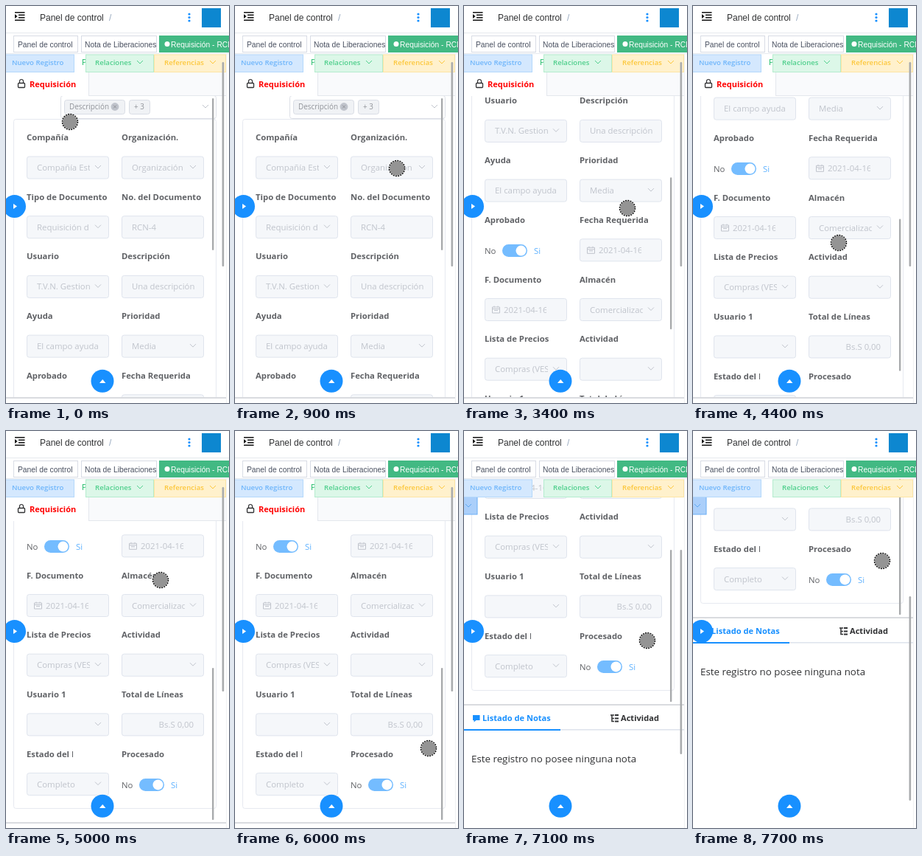
Animation, 303 px wide and 538 px high, one loop 8 s. Source, as an HTML page:

```html
<!DOCTYPE html>
<html lang="es">
<head>
<meta charset="utf-8">
<title>Requisición</title>
<style>
  html, body { margin: 0; width: 100%; height: 100%; overflow: hidden; background: #fff; }
  #stage { display: block; width: 303px; height: 538px; font: 11.4px "Open Sans", "Noto Sans", sans-serif; fill: #606266; }
  .ui { font-family: "Liberation Sans", Arial, sans-serif; }
  .b { font-weight: 700; font-size: 11.3px; }
  .act { font-weight: 600; font-size: 9.6px; }
  .mute { fill: #c0c4cc; }
  .line { fill: none; stroke: #c0c4cc; }
  .box { fill: #f5f7fa; stroke: #dfe4ed; }
  .thumb { fill: #a9abad; }
</style>
</head>
<body>
<svg id="stage" viewBox="0 0 303 538">
  <g id="page">
    <svg y="122" width="299" height="409" viewBox="0 122 299 409"><g id="form"></g></svg>
    <rect id="innerThumb" class="thumb" x="280" y="125" width="2.4" height="206" rx="1.2"/>
    <g id="notes"></g>
  </g>
  <g id="split"></g>
  <g id="tabs"></g>
  <g id="actions"></g>
  <g id="header"></g>
  <rect id="outerThumb" class="thumb" x="293.6" y="76" width="2.6" height="277" rx="1.3"/>
  <g id="floating"></g>
  <g id="touch">
    <circle r="11" fill="#fff" opacity=".7"/>
    <circle r="10" fill="#949494"/>
    <circle r="10.5" fill="none" stroke="#111" stroke-width="1.5" stroke-dasharray="2 1.3"/>
  </g>
</svg>
<script>
const $ = id => document.getElementById(id);

const text = (x, y, str, attrs = '') => `<text x="${x}" y="${y}" ${attrs}>${str}</text>`;
const rect = (x, y, w, h, attrs = '') => `<rect x="${x}" y="${y}" width="${w}" height="${h}" ${attrs}/>`;
const path = (d, attrs = 'class="line"') => `<path d="${d}" ${attrs}/>`;
const circle = (x, y, r, attrs) => `<circle cx="${x}" cy="${y}" r="${r}" ${attrs}/>`;
const chevron = (x, y, attrs) => path(`M${x - 4} ${y - 2}l4 4 4-4`, attrs);
const clipped = (x, y, w, str, cls) =>
  `<svg x="${x}" y="${y - 10}" width="${w}" height="20">${text(0, 14, str, `class="${cls}"`)}</svg>`;

// Controls: x is the left edge of the column, y the vertical centre
const box = (x, y) => rect(x + .5, y - 15, 111, 30, 'rx="3" class="box"');
const controls = {
  select: (x, y, v) => box(x, y) + clipped(x + 14, y, 72, v, 'mute') + chevron(x + 97, y - 1),
  input: (x, y, v) => box(x, y) + clipped(x + 14, y, 90, v, 'mute'),
  number: (x, y, v) => box(x, y) + text(x + 98, y + 4, v, 'class="mute" text-anchor="end"'),
  date: (x, y, v) => box(x, y) + clipped(x + 26, y, 58, v, 'mute') +
    path(`M${x + 10.5} ${y - 3.5}h10v8h-10zm0 2.5h10m-7.5-4v2m5-2v2m-5 4h5`),
  toggle: (x, y) => text(x, y + 5, 'No') + rect(x + 24, y - 7.7, 34, 17, 'rx="8.5" fill="#74bcff"') +
    circle(x + 49.5, y + .8, 7, 'fill="#fff"') + text(x + 67, y + 5, 'Si', 'fill="#5fb2ff"'),
};

const fields = [
  ['Compañía', 'select', 'Compañía Est'], ['Organización.', 'select', 'Organización'],
  ['Tipo de Documento', 'select', 'Requisición d'], ['No. del Documento', 'input', 'RCN-4'],
  ['Usuario', 'select', 'T.V.N. Gestion'], ['Descripción', 'input', 'Una descripción'],
  ['Ayuda', 'input', 'El campo ayuda'], ['Prioridad', 'select', 'Media'],
  ['Aprobado', 'toggle'], ['Fecha Requerida', 'date', '2021-04-16'],
  ['F. Documento', 'date', '2021-04-16'], ['Almacén', 'select', 'Comercializadora'],
  ['Lista de Precios', 'select', 'Compras (VES)'], ['Actividad', 'select', ''],
  ['Usuario 1', 'select', ''], ['Total de Líneas', 'number', 'Bs.S 0,00'],
  ['Estado del Documento', 'select', 'Completo'], ['Procesado', 'toggle'],
];

$('form').innerHTML =
  rect(74.5, 121.5, 211, 31, 'rx="3" fill="#fff" stroke="#dcdfe6"') +
  rect(79.5, 127.5, 82, 19, 'rx="3" fill="#f0f2f5" stroke="#d9dde5"') +
  text(86, 140, 'Descripción', 'font-size="9.9" fill="#909399"') +
  circle(148, 136.5, 5.4, 'fill="#c0c4cc"') +
  path('M146 134.500l4 4m0-4l-4 4', 'stroke="#909399"') +
  rect(167.5, 127.5, 28, 19, 'rx="3" fill="#f0f2f5" stroke="#d9dde5"') +
  text(174, 140, '+ 3', 'font-size="9.9" fill="#909399"') +
  chevron(271, 136) +
  rect(10.5, 153.5, 275, 358 + 386, 'rx="3" fill="none" stroke="#e6e9f0"') +
  fields.map(([label, kind, value], i) => {
    const x = i % 2 ? 157 : 28, y = 178 + (i >> 1) * 80.7;
    return clipped(x, y, label.startsWith('Estado') ? 63 : 115, label, 'b') + controls[kind](x, y + 41, value);
  }).join('');

$('notes').innerHTML =
  rect(0, 530, 299, 2, 'fill="#d9dbdf"') + rect(0, 532, 299, 360, 'fill="#fff"') +
  path('M12 545h9.500v7h-5l-3 2.500v-2.500h-1.500z', 'fill="#1890ff"') +
  text(25, 553, 'Listado de Notas', 'class="b" style="font-size:11.1px" fill="#1890ff"') +
  path('M199 545h5m-3 0v8.500h3m-3-4h3', 'fill="none" stroke="#303133" stroke-width="1.500"') +
  path('M205 545h5m-5 4.500h5m-5 4h5', 'stroke="#303133" stroke-width="2"') +
  text(213, 553, 'Actividad', 'class="b" style="font-size:11.1px" fill="#303133"') +
  rect(0, 564, 299, 1.6, 'fill="#dfe4ed"') + rect(0, 564, 131, 2, 'fill="#1890ff"') +
  text(10, 609, 'Este registro no posee ninguna nota', 'font-size="13.35" fill="#303133"');

$('split').innerHTML = rect(-4, 89.5, 22, 23.5, 'fill="#abcffa" stroke="#6aaef5"') +
  chevron(6, 101, 'fill="none" stroke="#5ea8f0"');

$('tabs').innerHTML =
  rect(0, 64, 299, 58, 'fill="#fff"') + rect(112, 90, 187, 32, 'fill="#f9fafc"') +
  path('M112.500 90v32M112 121.500h187', 'class="line" style="stroke:#e4e7ed"') +
  text(103, 80, 'P', 'fill="#13b85f" font-size="11"') +
  rect(16.5, 104.5, 9, 6, 'rx="1" fill="none" stroke="#303133" stroke-width="1.300"') +
  path('M18.500 104v-2a2.500 2.500 0 0 1 5 0v2', 'fill="none" stroke="#303133" stroke-width="1.200"') +
  text(32, 110, 'Requisición', 'class="b" style="font-size:11px" fill="#f00"');

const action = (x, w, label, textX, ink, fill, edge) =>
  rect(x + .5, 66, w - 1, 23.5, `fill="${fill}" stroke="${edge}"`) +
  text(textX, 80, label, `class="act" fill="${ink}"`);
$('actions').innerHTML =
  action(-4, 97, 'Nuevo Registro', 8, '#6db5fb', '#d4e8fe', '#b5d8fb') +
  action(108, 93, 'Relaciones', 121, '#4fcf8c', '#dcf7e8', '#b4ecce') +
  chevron(182, 76, 'fill="none" stroke="#4fcf8c"') +
  action(201, 98, 'Referencias', 215, '#fcc73c', '#fff1cc', '#fde5a4') +
  chevron(281, 76, 'fill="none" stroke="#fcc73c"');

const tag = (x, w, label, textX, ink, fill, edge) =>
  rect(x + .5, 40.5, w - 1, 22, `fill="${fill}" stroke="${edge}"`) +
  text(textX, 55.7, label, `class="ui" font-size="10.3" fill="${ink}"`);
$('header').innerHTML =
  rect(0, 0, 303, 65, 'fill="#fff"') +
  path('M0 36.500h303M0 64.500h303', 'stroke="#e6e9ee"') +
  path('M12 8.700h13.500M17 12.300h8.500M17 15.700h8.500M12 19.300h13.500', 'stroke="#111" stroke-width="1.500"') +
  path('M12 11v6l3.500-3z', 'fill="#111"') +
  text(46, 20, 'Panel de control', 'class="ui" font-size="12" fill="#303133"') +
  text(140, 20, '/', 'class="ui" font-size="12" fill="#97a8be"') +
  [11, 15.5, 20].map(y => circle(249, y, 1.6, 'fill="#1890ff"')).join('') +
  rect(266, 3, 26, 26, 'fill="#0d87d0"') +
  tag(10, 88, 'Panel de control', 16, '#495060', '#fff', '#d8dce5') +
  tag(102, 103, 'Nota de Liberaciones', 107, '#495060', '#fff', '#d8dce5') +
  tag(208, 110, 'Requisición - RCN-4', 224, '#fff', '#42b983', '#42b983') +
  circle(219, 51.5, 3.5, 'fill="#fff"') +
  path('M299.500 65v473', 'stroke="#f0f1f3"');

$('floating').innerHTML =
  circle(11.6, 271.5, 15.4, 'fill="#1890ff"') + path('M10 268v7l5-3.500z', 'fill="#fff"') +
  circle(131, 508.3, 15.5, 'fill="#1890ff"') + path('M127 511h8.500l-4.250-5z', 'fill="#fff"');

// The picture advances every 100 ms except during these pauses
const pauses = [[1800, 3400], [5800, 6000], [6000, 6200], [6800, 7100], [7100, 7300], [7300, 7500], [7500, 7700], [7700, 8000]];
const tick = t => {
  const pause = pauses.find(([from, to]) => t >= from && t < to);
  return pause ? pause[0] : Math.floor(t / 100) * 100;
};

// [time, touch x, touch y]
const touchKeys = [
  [0, 87, 157], [200, 84, 125], [400, 118, 107], [700, 185, 150], [900, 220, 220],
  [1300, 208, 310], [1800, 237, 420],
  [3400, 222, 274], [3800, 226, 200], [4200, 196, 345], [4400, 198, 321], [5000, 210, 202],
  [5200, 228, 172], [5500, 258, 330], [5800, 267, 464], [6000, 263, 430], [6200, 262, 424],
  [6600, 249, 376], [6800, 246, 341], [7100, 249, 284], [7300, 252, 272], [7500, 255, 258], [7700, 257, 176],
];
const formKeys = [[0, 0], [1800, 0], [3400, 211], [3800, 285], [4200, 300], [4400, 322], [4800, 386]];
const pageKeys = [[0, 0], [6100, 0], [6200, 18], [6600, 66], [6800, 101], [7100, 160], [7300, 176], [7500, 192], [7700, 278]];

function sample(keys, t, col = 1) {
  const i = keys.findIndex(k => k[0] > t);
  if (i < 0) return keys[keys.length - 1][col];
  const a = keys[i - 1], b = keys[i];
  return a[col] + (b[col] - a[col]) * (t - a[0]) / (b[0] - a[0]);
}
const move = (id, x, y) => $(id).setAttribute('transform', `translate(${x} ${y})`);

function draw(now) {
  const t = tick(now % 8000);
  const form = sample(formKeys, t), page = sample(pageKeys, t);
  move('form', 0, -form);
  move('innerThumb', 0, form * .508);
  move('page', 0, -page);
  move('tabs', 0, -page);
  move('outerThumb', 0, page * .532);
  move('touch', sample(touchKeys, t), sample(touchKeys, t, 2));
  requestAnimationFrame(draw);
}
requestAnimationFrame(draw);
</script>
</body>
</html>
```
